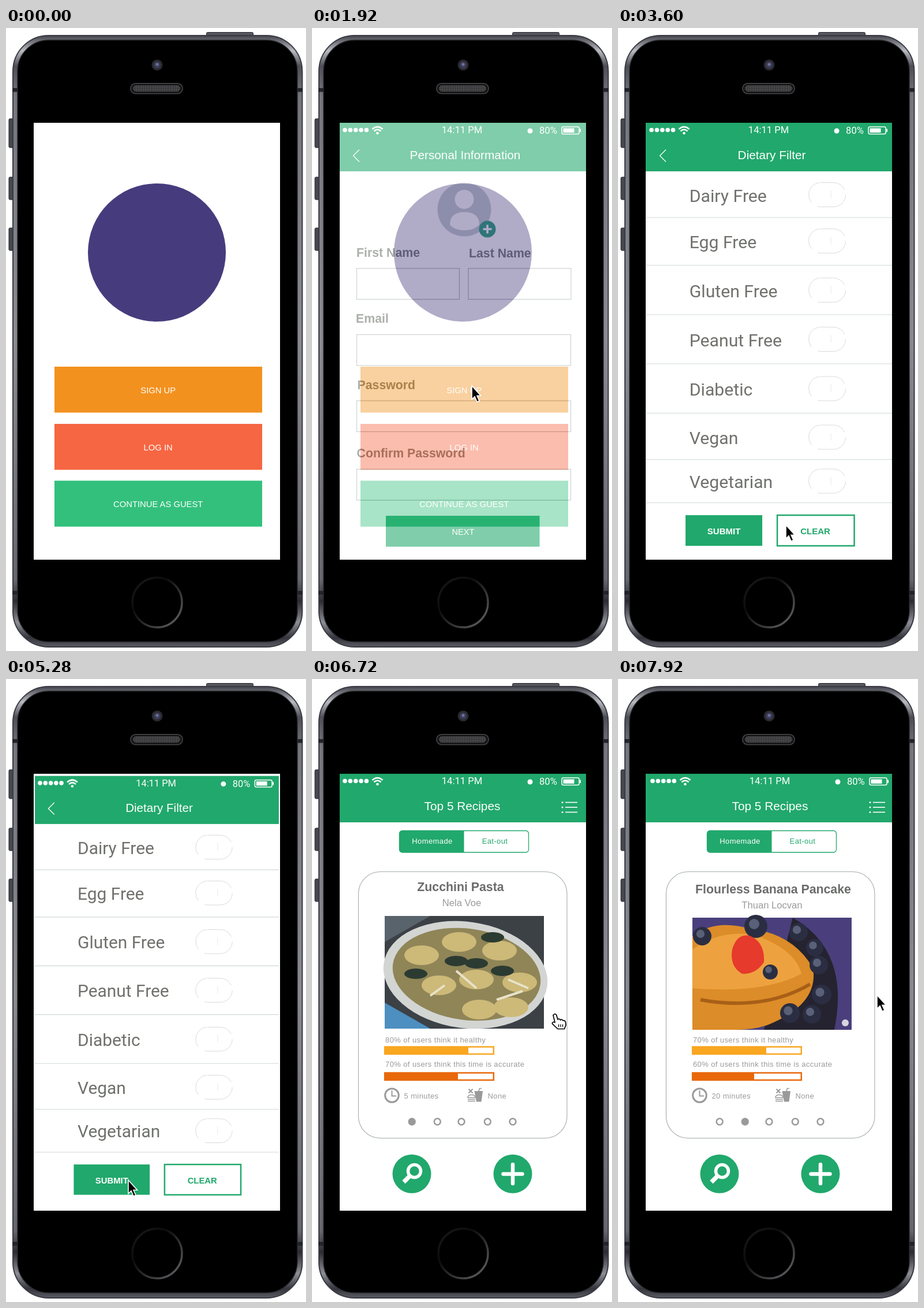
Animation, 520 px wide and 1078 px high, one loop 8 s. Source, as an HTML page:

```html
<!DOCTYPE html>
<html lang="en">
<head>
<meta charset="utf-8">
<title>Recipe app walkthrough</title>
<style>
  html, body { margin: 0; width: 100%; height: 100%; overflow: hidden; background: #fff; }
  svg { display: block; width: 100%; height: 100%; }
  text { font-family: "Liberation Sans", Arial, sans-serif; }
  .roboto { font-family: Roboto, sans-serif; }
  .bold { font-weight: 700; }
  .spaced { letter-spacing: .4px; }
</style>
</head>
<body>
<svg id="stage" viewBox="0 0 520 1078" xmlns="http://www.w3.org/2000/svg"></svg>
<script>
const LOOP = 8000, STEP = 80, WIDTH = 427;
const GREEN = '#21a86c', LABEL = '#70766e', GREY = '#9a9a9a';

// Drawing helpers
const rect = (x, y, w, h, fill, more = '') =>
  `<rect x="${x}" y="${y}" width="${w}" height="${h}" fill="${fill}" ${more}/>`;
const circle = (x, y, r, fill, more = '') =>
  `<circle cx="${x}" cy="${y}" r="${r}" fill="${fill}" ${more}/>`;
const ellipse = (x, y, rx, ry, fill, more = '') =>
  `<ellipse cx="${x}" cy="${y}" rx="${rx}" ry="${ry}" fill="${fill}" ${more}/>`;
const line = (d, color, width, more = '') =>
  `<path d="${d}" fill="none" stroke="${color}" stroke-width="${width}" ${more}/>`;
const text = (s, x, y, size, fill, cls = '', anchor = 'start') =>
  `<text x="${x}" y="${y}" font-size="${size}" fill="${fill}" class="${cls}" text-anchor="${anchor}">${s}</text>`;
const centred = (s, x, y, size, fill, cls) => text(s, x, y, size, fill, cls, 'middle');
const group = (id, body, more = '') => `<g id="${id}" ${more}>${body}</g>`;
const page = (id, body) => group(id, rect(48, 164, WIDTH, 756, '#fff') + body);
const stroke = (color, width) => `stroke="${color}" stroke-width="${width}"`;

function header(title, menu) {
  const nav = menu
    ? [213.5, 222, 230.5].map(y => circle(434, y, 1.5, '#fff') + line(`M439 ${y}H460`, '#fff', 1.6)).join('')
    : line('M82 210.500L71.500 221L82 231.500', '#fff', 1.3);
  return rect(48, 164, WIDTH, 84, GREEN) +
    [57, 66.4, 75.8, 85.1, 94.4].map(x => circle(x, 176.5, 3.8, '#fff')).join('') +
    line('M104.500 175Q113.500 167 122.500 175M107.500 178.500Q113.500 173 119.500 178.500', '#fff', 2.6) +
    circle(113.5, 182, 2.3, '#fff') +
    centred('14:11 PM', 260, 182, 16.6, '#fff', 'roboto') +
    circle(378, 178, 4.5, '#fff') +
    text('80%', 394, 183.3, 16.6, '#fff', 'roboto') +
    rect(433, 171, 30, 12.5, 'none', stroke('#fff', 1.5) + ' rx="2.500"') +
    rect(435.5, 173.5, 19, 7.5, '#fff') + rect(464, 174.5, 2, 5.5, '#fff') +
    nav + centred(title, title[0] === 'T' ? 260.5 : 265.5, 227.3, 20.8, '#fff');
}

function welcome() {
  const buttons = [['SIGN UP', 586, '#f3911f'], ['LOG IN', 685, '#f66642'], ['CONTINUE AS GUEST', 783.3, '#33c07c']];
  return page('welcome', circle(261.5, 388.5, 119.5, '#463c7d') +
    buttons.map(([label, y, color]) => rect(84, y, 360, 79.5, color) +
      centred(label, 263.7, y + 46, 14.8, '#fff')).join(''));
}

function personal() {
  const labels = [['First Name', 77, 395.5], ['Last Name', 272, 396.5], ['Email', 76, 510],
    ['Password', 78.5, 624.5], ['Confirm Password', 77.5, 743]];
  const fields = [[77.5, 416, 178], [271, 416, 178], [77.5, 530.5, 371], [77.5, 645, 371], [77.5, 763.5, 371]];
  return page('personal', header('Personal Information') +
    circle(264, 314, 46.5, '#c3cccf') + circle(264, 296.5, 16.5, '#fff') +
    '<path d="M239 340C239 324 250 318.500 264 318.500S290 324 290 340C284 347 274 350 264 350S244 347 239 340Z" fill="#fff"/>' +
    circle(304, 348, 14.5, '#1f9f76') + line('M304 340.500V355.500M296.500 348H311.500', '#fff', 3.6) +
    labels.map(([s, x, y]) => text(s, x, y, 21.3, LABEL, 'bold')).join('') +
    fields.map(([x, y, w]) => rect(x, y, w, 53.5, '#fff', stroke('#a9b4b4', 1.2))).join('') +
    rect(128, 844, 266.5, 53.5, GREEN) + centred('NEXT', 262, 877, 14.6, '#fff'));
}

function dietary() {
  const rows = [['Dairy Free', 300.5, 328], ['Egg Free', 380.5, 410.5], ['Gluten Free', 465.5, 496],
    ['Peanut Free', 550.5, 581], ['Diabetic', 636, 666.5], ['Vegan', 720, 746.5], ['Vegetarian', 796, 821.5]];
  return page('dietary', header('Dietary Filter') +
    rows.map(([s, base, y]) => text(s, 122.7, base, 30.2, '#6f716c', 'roboto') +
      line(`M48 ${y}H475`, '#cfdada', 1.2) +
      rect(329.5, base - 33, 64, 42, 'none', stroke('#d4d6d6', .9) + ' rx="21" stroke-dasharray="46 9 60 13"') +
      line(`M368 ${base - 19}v13`, '#dfe1e1', .8)).join('') +
    rect(116, 843, 133, 53, GREEN) + centred('SUBMIT', 182.5, 876, 15, '#fff', 'bold') +
    rect(275, 843, 133.5, 53, '#fff', stroke(GREEN, 2.5)) + centred('CLEAR', 341, 876, 15, GREEN, 'bold'));
}

const pastaPhoto = () => rect(126, 410, 276, 195, '#3c4146') +
  '<path d="M126 410H205L126 455Z" fill="#59636c"/><path d="M126 560L205 605H126Z" fill="#4d8fc0"/>' +
  ellipse(266, 512, 143, 92, '#d3d5d3', 'transform="rotate(8 266 512)"') +
  ellipse(268, 511, 129, 79, '#8f8557', 'transform="rotate(8 268 511)"') +
  [[190, 478], [255, 455], [325, 470], [360, 525], [285, 520], [220, 530], [290, 572], [345, 568]]
    .map(([x, y]) => ellipse(x, y, 30, 17, '#cdb978')).join('') +
  [[250, 488], [313, 447], [285, 492], [180, 510], [330, 505]]
    .map(([x, y]) => ellipse(x, y, 20, 9, '#2c3b32')).join('') +
  line('M205 548L230 530M250 505L285 535M320 555L365 540M340 520L375 535', '#e8e3c9', 4);

const pancakePhoto = () => rect(126, 413, 276, 194, '#4a3f7c') +
  '<path d="M300 413Q400 470 372 607H250Z" fill="#25232f"/>' +
  '<path d="M126 445Q165 415 225 432Q300 440 335 500Q345 560 265 595Q240 607 200 607H126Z" fill="#dc8c28"/>' +
  '<path d="M126 468Q180 430 240 445Q305 470 315 510Q250 545 126 535Z" fill="#eda23f"/>' +
  line('M140 555Q250 575 330 528', '#a85f17', 6) +
  [[236, 428, 20], [310, 438, 16], [338, 465, 15], [345, 495, 16], [350, 546, 17], [295, 578, 17], [333, 580, 16], [143, 445, 16], [261, 507, 13]]
    .map(([x, y, r]) => circle(x, y, r, '#2b2e42') + circle(x - 3, y - 4, r * .45, '#596077')).join('') +
  '<path d="M195 468Q203 440 225 444Q252 455 250 490Q235 512 212 510Q190 497 195 468Z" fill="#e63a2c"/>' +
  circle(391, 595, 6, '#d8d5df');

function recipe(id, r) {
  const bar = (y, w, color) => rect(126.2, y, 188.6, 12.5, '#fff', stroke(color, 2.5)) + rect(126, y, w, 12.5, color);
  return page(id, header('Top 5 Recipes', true) +
    rect(151.5, 262.5, 224, 37.5, '#fff', stroke(GREEN, 1.3) + ' rx="5"') +
    `<path d="M263.500 262.500H156.500Q151.500 262.500 151.500 267.500V295Q151.500 300 156.500 300H263.500Z" fill="${GREEN}"/>` +
    centred('Homemade', 208.5, 285, 13, '#fff', 'spaced') + centred('Eat-out', 317, 285, 13, GREEN, 'spaced') +
    rect(80.5, 333.5, 361.5, 461, '#fff', stroke('#a4acac', 1.1) + ' rx="38"') +
    centred(r.title, r.mid, r.top, 21.3, '#6a6c6a', 'bold') +
    centred(r.author, r.mid + (r.mid < 260 ? 2 : -2), r.top + 26, 16.6, GREY) +
    r.photo() +
    text(`${r.healthy}% of users think it healthy`, 127, 628.5, 13, GREY, 'spaced') + bar(636.5, r.bars[0], '#f9a620') +
    text(`${r.accurate}% of users think this time is accurate`, 127, 671, 13, GREY, 'spaced') + bar(681.5, r.bars[1], '#e8680a') +
    circle(138.5, 720.5, 11.8, '#fff', stroke(GREY, 3)) + line('M138.500 712V721.500H146', GREY, 2) +
    text(`${r.minutes} minutes`, 159.5, 725.7, 13, GREY, 'spaced') +
    line('M271.500 709.500L278.500 716.500M278.500 709.500L271.500 716.500', GREY, 2) +
    line('M270 724.500Q270 719.500 276.500 719.500T283 724.500ZM270 727.500H283M270 730.500H283', GREY, 1.5) +
    `<path d="M281.500 713H296L293.500 731.500H285Z" fill="${GREY}"/>` + line('M289 713L290.500 708.500H294', GREY, 1.6) +
    text('None', 304.5, 725.7, 13, GREY, 'spaced') +
    [173.2, 217.3, 259, 304.3, 348].map((x, i) =>
      circle(x, 766, 5.4, i === r.index ? GREY : '#fff', stroke(GREY, 2.5))).join('') +
    circle(173, 856.3, 33.5, GREEN) + circle(177.5, 851.5, 11, 'none', stroke('#fff', 5.5)) +
    line('M169 860.500L159 870.500', '#fff', 7.5) +
    circle(348, 856.3, 33.5, GREEN) + line('M348 840V873M331.500 856.500H364.500', '#fff', 6.5, 'stroke-linecap="round"'));
}

function phone() {
  const stops = [[0, '#44454d'], [.025, '#b9bac0'], [.05, '#4d4e56'], [.1, '#75767d'], [.5, '#8a8b91'], [.89, '#66676e'],
    [.925, '#2b2b31'], [.96, '#8d8e95'], [.985, '#34353c'], [1, '#5a5b63']];
  return `<defs>
    <linearGradient id="metal" x2="0" y2="1">${stops.map(([o, c]) => `<stop offset="${o}" stop-color="${c}"/>`).join('')}</linearGradient>
    <linearGradient id="ring" x2="1" y2="1"><stop stop-color="#1b1b1d"/><stop offset=".35" stop-color="#0c0c0d"/><stop offset="1" stop-color="#68686c"/></linearGradient>
    <pattern id="mesh" width="3" height="3" patternUnits="userSpaceOnUse">${rect(0, 0, 3, 3, '#2c2c2e')}${circle(1.5, 1.5, .9, '#707074')}</pattern>
    <clipPath id="screen">${rect(48, 164, WIDTH, 756, '#000')}</clipPath>
    <clipPath id="tinted">${circle(261.5, 388.5, 119.5, '#000')}${[586, 685, 783.3].map(y => rect(84, y, 360, 79.5, '#000')).join('')}</clipPath>
    </defs>` +
    [[157, 50], [258, 39], [346, 39]].map(([y, h]) => rect(5, y, 9, h, '#47484f', 'rx="2" ' + stroke('#222329', 1))).join('') +
    rect(347.5, 7.5, 81, 9, '#56575f', 'rx="2" ' + stroke('#26272d', 1)) +
    rect(12, 13, 501.5, 1058, 'url(#metal)', 'rx="62" ' + stroke('#393a42', 2)) +
    [104, 974].map(y => rect(11, y, 503, 6.5, '#222329')).join('') +
    rect(20, 21, 485, 1041, '#000', 'rx="54" ' + stroke('#26262b', 1.5)) +
    circle(262, 64, 9.5, '#29292e') + circle(262, 64, 6, '#3c3e56') + circle(262, 63, 2.5, '#6d71a0') +
    rect(216, 96, 90, 17.5, '#111', 'rx="8.750" ' + stroke('#3d3d40', 2)) + rect(220, 99, 82, 11, 'url(#mesh)', 'rx="5.500"') +
    circle(262, 994, 43, '#000', stroke('url(#ring)', 3.5));
}

const pointer =
  group('click', circle(0, 0, 51, 'none', stroke('#fff', 5)) + circle(0, 0, 51, 'none', stroke('#000', 2.3))) +
  group('arrow', '<path d="M0 0V23.500L5 18.700L9 28L13 26.300L9 17.300H15.500Z" fill="#000" stroke="#fff" stroke-width="1.600"/>') +
  group('hand', '<path d="M-3 2Q-.500 -2 2.500 1L5 9Q8 7 9.500 10Q12 8 14 11Q17.500 10 18.500 14L19 19L16.500 25.500H5L-4.500 16.500Q-5 12.500 0 14Z" fill="#fff" stroke="#000" stroke-width="1.700"/>' +
    line('M6.500 17.500V22M10 17.500V22M13.500 17.500V22', '#000', 1.3));

const stage = document.getElementById('stage');
stage.innerHTML = phone() +
  group('pages', rect(48, 164, WIDTH, 756, '#fff') + welcome() + personal() + dietary() +
    recipe('pasta', { title: 'Zucchini Pasta', author: 'Nela Voe', mid: 257.5, top: 367, photo: pastaPhoto,
      healthy: 80, accurate: 70, minutes: 5, bars: [145, 127], index: 0 }) +
    recipe('pancake', { title: 'Flourless Banana Pancake', author: 'Thuan Locvan', mid: 266, top: 371, photo: pancakePhoto,
      healthy: 70, accurate: 60, minutes: 20, bars: [128, 107], index: 1 }), 'clip-path="url(#screen)"') +
  group('cursor', pointer);

// Motion
const clamp = v => Math.min(1, Math.max(0, v));
const progress = (t, start, length) => clamp((t - start) / length);

// cubic-bezier(.25, .1, .25, 1), solved by bisection
function ease(p) {
  const curve = (s, a, b) => 3 * a * s * (1 - s) ** 2 + 3 * b * s * s * (1 - s) + s ** 3;
  let lo = 0, hi = 1;
  for (let i = 0; i < 24; i++) {
    const mid = (lo + hi) / 2;
    if (curve(mid, .25, .25) < p) lo = mid; else hi = mid;
  }
  return p <= 0 ? 0 : p >= 1 ? 1 : curve(hi, .1, 1);
}

const CURSOR = [[480, 470, 590], [1040, 277, 619], [2160, 277, 619], [2720, 290, 862], [3040, 291, 860], [4080, 291, 860],
  [4800, 212, 867], [5760, 212, 867], [6560, 421, 580], [6880, 421, 580], [7200, 449, 547], [8000, 449, 547]];
const HANDS = [[800, 1600], [2560, 3040], [4720, 5200], [6480, 7360]];
const CLICKS = [[1440, 1600], [2880, 3040], [5040, 5200], [7200, 7360]];

const el = id => document.getElementById(id);
const within = (spans, t) => spans.some(([a, b]) => t >= a && t < b);
const show = (id, on) => { el(id).style.display = on ? '' : 'none'; };

function pose(id, { x = 0, scale = 1, alpha = 1 } = {}) {
  show(id, alpha > 0 && Math.abs(x) < WIDTH);
  el(id).setAttribute('transform', `translate(${x + 261.5} 542) scale(${scale}) translate(-261.5 -542)`);
  el(id).setAttribute('opacity', alpha);
}

function drawCursor(t) {
  show('cursor', t >= CURSOR[0][0]);
  const next = Math.max(1, CURSOR.findIndex(k => k[0] > t));
  const [t0, x0, y0] = CURSOR[next - 1], [t1, x1, y1] = CURSOR[next];
  const p = progress(t, t0, t1 - t0), e = p * p * (3 - 2 * p);
  el('cursor').setAttribute('transform', `translate(${x0 + (x1 - x0) * e} ${y0 + (y1 - y0) * e})`);
  const hand = within(HANDS, t);
  show('hand', hand);
  show('arrow', !hand);
  show('click', within(CLICKS, t));
}

function render(t) {
  const fade = progress(t, 1600, 560);
  const push = ease(progress(t, 3040, 600));
  const pop = ease(progress(t, 5250, 600));
  const swap = clamp((pop - .2) / .8);
  const swipe = ease(progress(t, 7386, 600));
  pose('welcome', { alpha: fade < 1 ? 1 : 0 });
  pose('personal', { alpha: fade, x: -WIDTH * push });
  // The fade first shows only over the coloured areas.
  el('personal').setAttribute('clip-path', fade < .2 ? 'url(#tinted)' : 'none');
  if (push > 0) show('welcome', false);
  pose('dietary', { x: WIDTH * (1 - push), scale: 1 - .3 * pop, alpha: 1 - swap });
  pose('pasta', { x: -WIDTH * swipe, scale: .7 + .3 * pop, alpha: swap });
  pose('pancake', { x: WIDTH * (1 - swipe) });
  drawCursor(t);
}

const began = performance.now();
function tick() {
  render(Math.floor((performance.now() - began) / STEP) * STEP % LOOP);
  requestAnimationFrame(tick);
}
tick();
</script>
</body>
</html>
```
